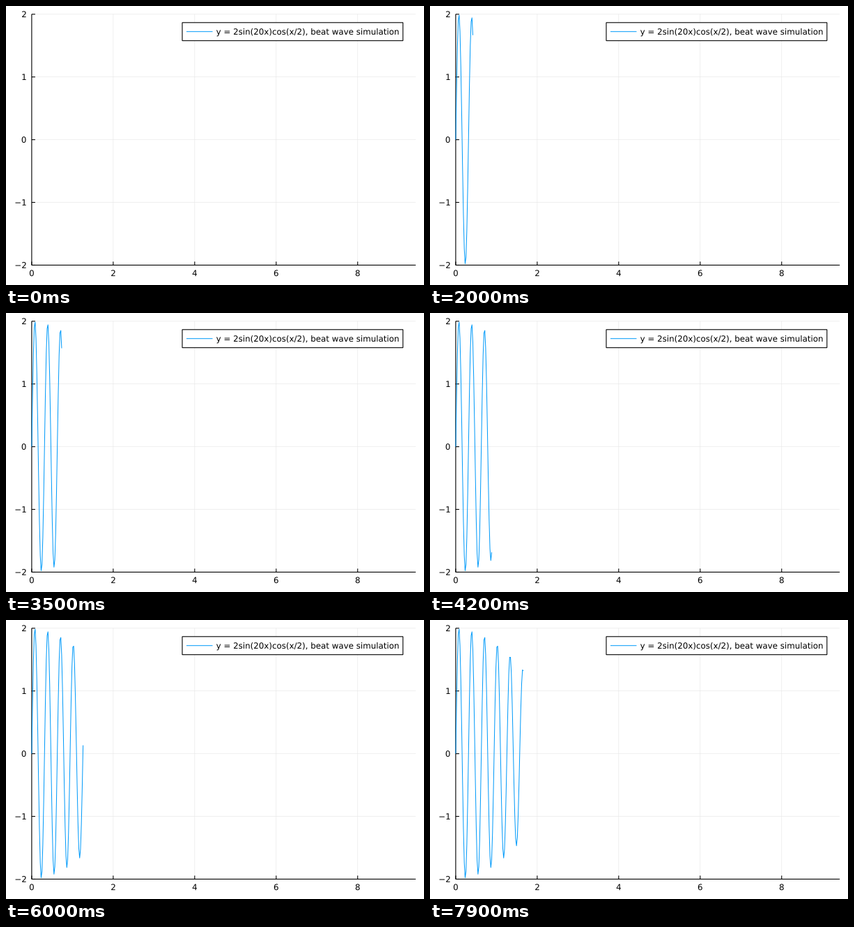
A matplotlib script that plays this animation: 600 px wide and 400 px high, repeating every 8 s.

```python
import numpy as np
import matplotlib.pyplot as plt
from matplotlib.animation import FuncAnimation
from matplotlib.patches import PathPatch, Rectangle
from matplotlib.path import Path
from matplotlib.textpath import TextPath

FRAMES, INTERVAL = 80, 100
PX = 0.72  # points per pixel at 100 dpi
STEP = 0.021013
FONT_SIZE = 11.85
BLUE, GRID = "#009afa", "#e6e6e6"
LEFT, RIGHT, TOP, BOTTOM = 36.9, 588.1, 11.8, 371.5

fig = plt.figure(figsize=(6, 4), dpi=100, facecolor="white")
ax = fig.add_axes([0, 0, 1, 1])
ax.set(xlim=(0, 600), ylim=(400, 0))
ax.axis("off")


def to_x(v):
    return LEFT + (RIGHT - LEFT) * v / (3 * np.pi)


def to_y(v):
    return (TOP + BOTTOM) / 2 - (BOTTOM - TOP) * v / 4


def line(xs, ys, color="black", width=1.1, z=2):
    return ax.plot(xs, ys, color=color, lw=width * PX, zorder=z,
                   solid_capstyle="butt", snap=False)[0]


def label(x, y, s, align=0.0):
    """Outline text on baseline y; align 0 = left, 0.5 = centre, 1 = right."""
    glyphs = TextPath((0, 0), s, size=FONT_SIZE,
                      prop={"family": "DejaVu Sans"})
    box = glyphs.get_extents()
    shift = x - box.x0 - align * box.width
    path = Path(glyphs.vertices * [1, -1] + [shift, y], glyphs.codes)
    ax.add_patch(PathPatch(path, fc="black", lw=0, zorder=5, snap=False))


def beat(x):
    return 2 * np.sin(20 * x) * np.cos(x / 2)


x_ticks, y_ticks = range(0, 9, 2), range(-2, 3)
for v in x_ticks:
    line([to_x(v)] * 2, [TOP, BOTTOM], GRID, 0.6, z=1)
for v in y_ticks:
    line([LEFT, RIGHT], [to_y(v)] * 2, GRID, 0.6, z=1)

line([LEFT, RIGHT], [BOTTOM] * 2)
line([LEFT] * 2, [TOP, BOTTOM])
for v in x_ticks:
    line([to_x(v)] * 2, [BOTTOM, BOTTOM - 5])
    label(to_x(v), 387.2, str(v), 0.5)
for v in y_ticks:
    line([LEFT, LEFT + 5], [to_y(v)] * 2)
    label(28.6, to_y(v) + 4.3, str(v).replace("-", "\u2212"), 1)

curve = line([], [], BLUE, 1, z=3)

ax.add_patch(Rectangle((253, 23.8), 316.8, 25.9, fc="white", ec="black",
                       lw=1.1 * PX, zorder=4, snap=False))
line([259, 296.5], [36.7] * 2, BLUE, 1, z=5)
label(302, 41, "y = 2sin(20x)cos(x/2), beat wave simulation")


def update(i):
    x = STEP * np.arange(i + 1)
    curve.set_data(to_x(x), to_y(beat(x)))
    return (curve,)


anim = FuncAnimation(fig, update, frames=FRAMES, interval=INTERVAL,
                     repeat=True, repeat_delay=0)
plt.show()
```
